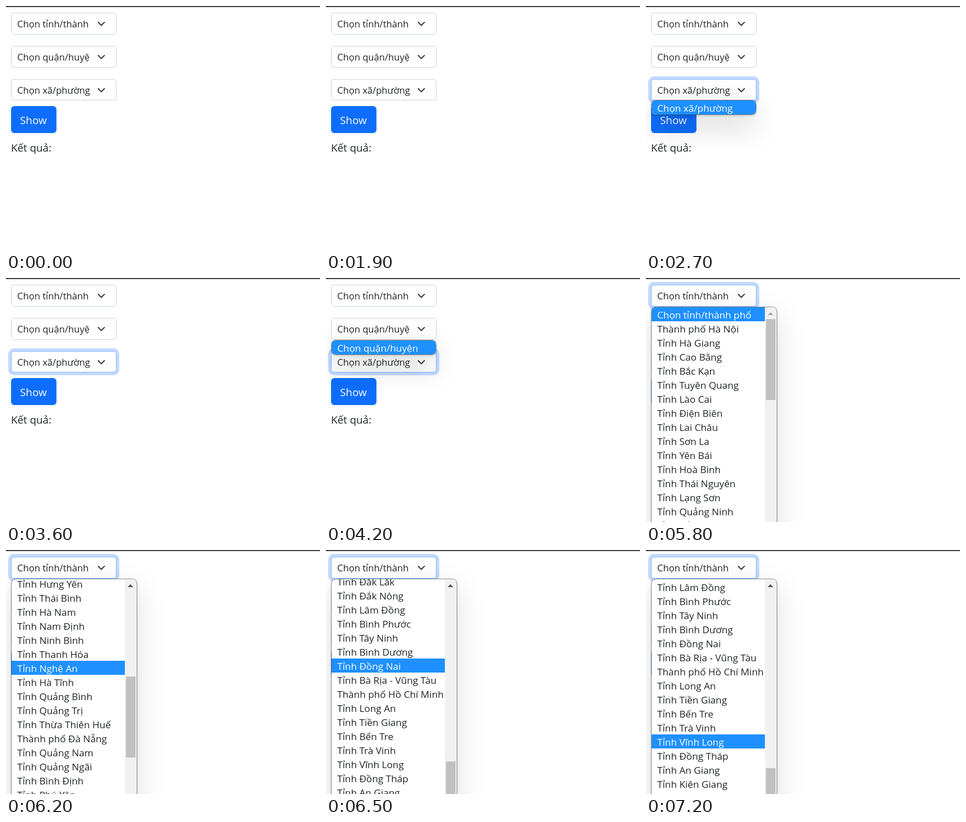
An HTML page that plays this animation: 560x434 px, repeating every 8 s.

```html
<!DOCTYPE html>
<html lang="vi">
<head>
<meta charset="utf-8">
<title>Chọn địa chỉ</title>
<style>
  html, body { margin: 0; width: 100%; height: 100%; overflow: hidden; background: #fff; }
  #stage {
    position: relative; width: 560px; height: 434px; overflow: hidden;
    font-family: "Open Sans", "Noto Sans", sans-serif; color: #212529; white-space: nowrap;
  }
  #stage > * { position: absolute; box-sizing: border-box; }
  #bar { left: 0; top: 0; width: 560px; height: 2px; background: linear-gradient(#2c2c2c 50%, #4a4a4a 50%); }

  .select {
    left: 9px; width: 188px; height: 39px; padding-left: 10px;
    border: 1px solid #ced4da; border-radius: 5px; background: #fff;
    font-size: 16.6px; line-height: 38px;
  }
  .select span { display: block; width: 130px; overflow: hidden; }
  .select svg { position: absolute; left: 152px; top: 12.5px; fill: none; stroke: #343a40; stroke-width: 2; stroke-linecap: round; stroke-linejoin: round; }
  .ring { position: absolute; inset: -1px; border: 1px solid #86b7fe; border-radius: 5px; box-shadow: 0 0 0 5px rgba(13, 110, 253, .25); opacity: 0; }

  #show {
    left: 9px; top: 178px; width: 81px; height: 48px; padding: 1px 0 0 16px;
    border-radius: 6px; background: #0d6efd; color: #fff; font-size: 18.85px; line-height: 48px;
  }
  #result { left: 9px; top: 237px; font-size: 18.8px; line-height: 30px; }

  .popup {
    --edge: 0 0 0 1px rgba(70, 70, 70, .55), 0 2px 5px rgba(0, 0, 0, .16);
    left: 10px; width: 186px; height: 25px; border-radius: 7px; visibility: hidden; background: #fff;
    box-shadow: var(--edge), 0 18px 52px rgba(0, 0, 0, .22);
  }
  .clip { position: absolute; inset: 0; overflow: hidden; border-radius: inherit; }
  .row { height: 25px; box-sizing: border-box; padding: 1px 0 0 10px; font-size: 17.2px; line-height: 25px; }
  .row.on { background: #1e90ff; color: #fff; }
  #list { top: 52px; width: 223px; height: 500px; box-shadow: var(--edge), 0 18px 56px rgba(0, 0, 0, .13); }
  #rows { width: 202px; }
  #track { position: absolute; left: 202px; top: 0; width: 21px; height: 500px; background: #f1f1f1; }
  #arrow { position: absolute; left: 5px; top: 9px; border: 5px solid transparent; border-top: 0; border-bottom: 5px solid #a3a3a3; }
  #thumb { position: absolute; left: 2px; top: 21px; width: 17px; height: 144px; background: #c1c1c1; }
</style>
</head>
<body>
<div id="stage">
  <div id="bar"></div>
  <div id="show">Show</div>
  <div id="result">Kết quả:</div>
</div>
<script>
  const LOOP = 8000, FRAME = 100, ROW = 25, LIST_TOP = 52;
  const stage = document.getElementById('stage');

  const provinces = ('Hà Giang,Cao Bằng,Bắc Kạn,Tuyên Quang,Lào Cai,Điện Biên,Lai Châu,Sơn La,Yên Bái,' +
    'Hoà Bình,Thái Nguyên,Lạng Sơn,Quảng Ninh,Bắc Giang,Phú Thọ,Vĩnh Phúc,Bắc Ninh,Hải Dương,*Hải Phòng,' +
    'Hưng Yên,Thái Bình,Hà Nam,Nam Định,Ninh Bình,Thanh Hóa,Nghệ An,Hà Tĩnh,Quảng Bình,Quảng Trị,' +
    'Thừa Thiên Huế,*Đà Nẵng,Quảng Nam,Quảng Ngãi,Bình Định,Phú Yên,Khánh Hòa,Ninh Thuận,Bình Thuận,' +
    'Kon Tum,Gia Lai,Đắk Lắk,Đắk Nông,Lâm Đồng,Bình Phước,Tây Ninh,Bình Dương,Đồng Nai,' +
    'Bà Rịa - Vũng Tàu,*Hồ Chí Minh,Long An,Tiền Giang,Bến Tre,Trà Vinh,Vĩnh Long,Đồng Tháp,An Giang,' +
    'Kiên Giang,*Cần Thơ,Hậu Giang,Sóc Trăng,Bạc Liêu,Cà Mau').split(',');
  // A star marks a city rather than a province.
  const options = ['Chọn tỉnh/thành phố', 'Thành phố Hà Nội',
    ...provinces.map(p => p[0] === '*' ? 'Thành phố ' + p.slice(1) : 'Tỉnh ' + p)];

  function add(className, html, top) {
    const el = document.createElement('div');
    el.className = className;
    el.innerHTML = html;
    el.style.top = top + 'px';
    stage.append(el);
    return el;
  }

  const addSelect = (label, top) => add('select',
    `<span>${label}</span><svg width="16" height="12"><path d="M2.5 3 8 8.5 13.5 3"/></svg><div class="ring"></div>`,
    top).querySelector('.ring');
  const addPopup = (label, top) => add('popup', `<div class="clip"><div class="row on">${label}</div></div>`, top);

  const cityRing = addSelect('Chọn tỉnh/thành', 12);
  const districtRing = addSelect('Chọn quận/huyện', 71);
  const wardRing = addSelect('Chọn xã/phường', 130);
  wardRing.parentNode.style.height = '38px';
  const districtPopup = addPopup('Chọn quận/huyện', 111);
  const wardPopup = addPopup('Chọn xã/phường', 168);

  const list = add('popup', '<div class="clip"><div id="rows">' +
    options.map(o => `<div class="row">${o}</div>`).join('') +
    '</div><div id="track"><div id="arrow"></div><div id="thumb"></div></div></div>', LIST_TOP);
  list.id = 'list';
  const rows = document.getElementById('rows');
  const thumb = document.getElementById('thumb');
  const arrow = document.getElementById('arrow');

  // Linear interpolation through [time, value] points.
  function track(t, points) {
    for (let i = 1; i < points.length; i++) {
      const [t0, v0] = points[i - 1], [t1, v1] = points[i];
      if (t < t1) return v0 + (v1 - v0) * Math.max(0, (t - t0) / (t1 - t0));
    }
    return points[points.length - 1][1];
  }

  const visible = (el, on) => { el.style.visibility = on ? 'visible' : 'hidden'; };

  function draw(t) {
    visible(wardPopup, t >= 2200 && t < 3600);
    visible(districtPopup, t >= 4100 && t < 5500);
    visible(list, t >= 5600);

    wardRing.style.opacity = track(t, [[2200, 0], [2400, 1], [4200, 1], [4400, 0]]);
    districtRing.style.opacity = track(t, [[4200, 0], [4400, 1], [5500, 1], [5700, 0]]);
    cityRing.style.opacity = track(t, [[5500, 0], [5700, 1]]);

    const scroll = track(t, [[5900, 0], [6500, 1059], [6600, 1099]]);
    const pointer = track(t, [[5900, 65], [6100, 206], [6500, 206], [7100, 341]]);
    const active = Math.floor((pointer - LIST_TOP + scroll) / ROW);
    [...rows.children].forEach((row, i) => row.classList.toggle('on', i === active));
    rows.style.transform = `translateY(${-Math.round(scroll)}px)`;
    thumb.style.transform = `translateY(${Math.round(scroll * .2865)}px)`;
    arrow.style.borderBottomColor = scroll > 0 ? '#505050' : '#a3a3a3';
  }

  const start = performance.now();
  function tick() {
    const t = (performance.now() - start) % LOOP;
    draw(Math.floor(t / FRAME) * FRAME);
    requestAnimationFrame(tick);
  }
  tick();
</script>
</body>
</html>
```
